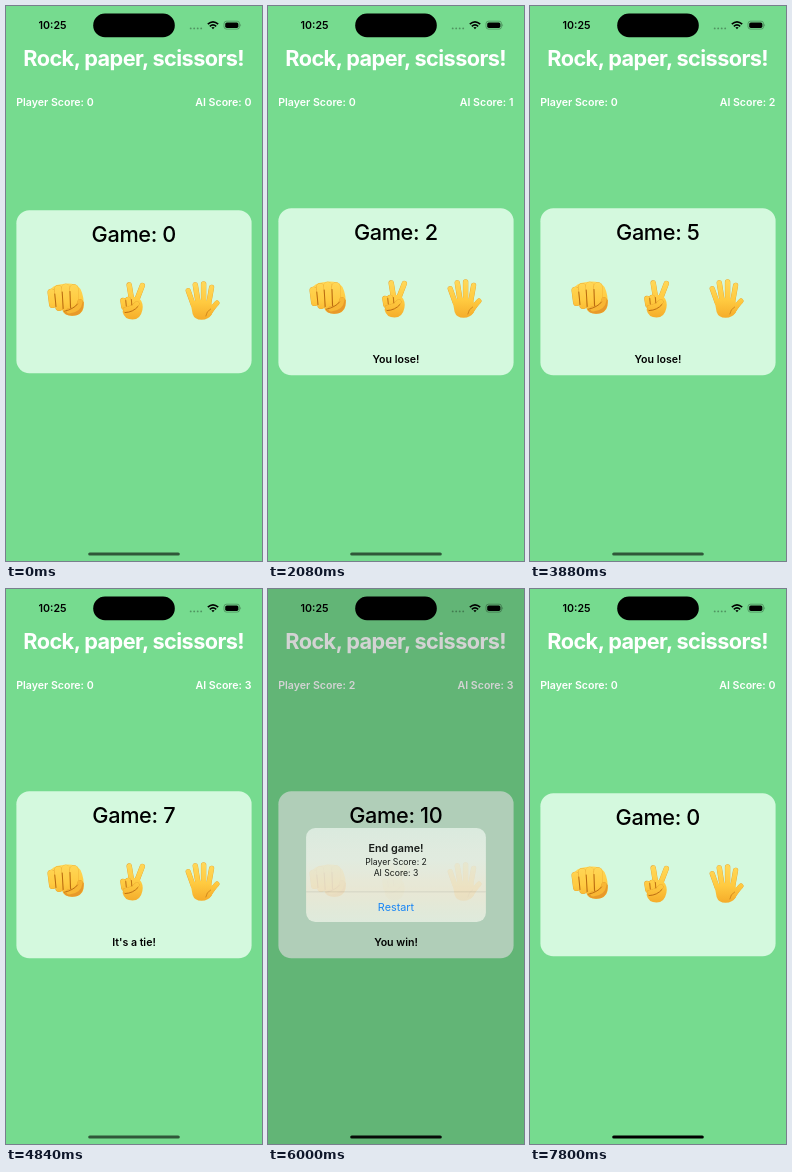
An HTML page that plays this animation: 256 by 555 pixels, repeating every 8 s.

```html
<!DOCTYPE html>
<html lang="en">
<head>
<meta charset="utf-8">
<title>Rock, paper, scissors</title>
<style>
  html, body { margin: 0; width: 100%; height: 100%; overflow: hidden; background: #76db8f; }
  svg { display: block; width: 100vw; height: 100vh; }
  text { font-family: Inter, "Liberation Sans", sans-serif; font-size: 10.6px; }
  .large { font-size: 21.7px; }
  .bold { font-weight: 700; letter-spacing: -.026em; }
  .semi { font-weight: 600; }
  .medium { font-weight: 500; letter-spacing: -.016em; }
  .small { font-size: 8.46px; }
  .mid { text-anchor: middle; }
  .end { text-anchor: end; }
  .white { fill: #fff; }
</style>
</head>
<body>
<svg viewBox="0 0 256 555" preserveAspectRatio="none">
  <defs>
    <linearGradient id="skin" gradientUnits="userSpaceOnUse" x1="0" y1="275" x2="0" y2="314">
      <stop offset="0" stop-color="#ffd95a"/>
      <stop offset=".55" stop-color="#ffca40"/>
      <stop offset="1" stop-color="#f5ac2a"/>
    </linearGradient>
    <linearGradient id="glass" x1="0" y1="0" x2="0" y2="1">
      <stop offset="0" stop-color="#e2efe5"/>
      <stop offset=".35" stop-color="#eaf0e6"/>
      <stop offset=".65" stop-color="#f2ecd9"/>
      <stop offset="1" stop-color="#e6efe2"/>
    </linearGradient>
  </defs>

  <rect width="256" height="555" fill="#76db8f"/>
  <text class="large bold white mid" x="127.7" y="59.7">Rock, paper, scissors!</text>
  <text id="player" class="semi white" x="10.2" y="99.8"></text>
  <text id="ai" class="semi white end" x="245.4" y="99.8"></text>

  <rect id="card" x="10.4" width="235.2" rx="13" fill="#d4f9de"/>
  <g id="content">
    <text id="game" class="large medium mid" x="127.8" y="236"></text>
    <g id="rock"></g>
    <g id="scissors"></g>
    <g id="paper"></g>
  </g>
  <text id="message" class="semi mid" x="128" y="356.5"></text>

  <rect id="shade" width="256" height="555"/>
  <g id="alert">
    <rect x="40" y="240" width="176" height="92" rx="9" fill="url(#glass)"/>
    <path id="pressed" d="M40 302.5H216V323a9 9 0 0 1-9 9H49a9 9 0 0 1-9-9Z" fill="#1c3a24"/>
    <path d="M40 302.5H216" stroke="#3c3c43" stroke-opacity=".25" stroke-width=".5"/>
    <text class="semi mid" x="128" y="263.6">End game!</text>
    <text class="small mid" x="128" y="276.3">Player Score: 2</text>
    <text class="small mid" x="128" y="286.8">AI Score: 3</text>
    <text class="mid" x="128" y="321.3" fill="#007aff">Restart</text>
  </g>

  <text class="semi mid" x="46.5" y="23.2">10:25</text>
  <rect x="87.2" y="7.6" width="81.6" height="23.6" rx="11.8"/>
  <path d="M184.7 22.4h12" stroke="#000" stroke-opacity=".32" stroke-width="1.9" stroke-linecap="round" stroke-dasharray="0 3.5"/>
  <g fill="none" stroke="#000" stroke-width="1.6">
    <path d="M201.8 18.2Q207 13.5 212.2 18.2M203.8 20.3Q207 17.5 210.2 20.3"/>
    <path d="M207 23.2l-1.6-1.8q1.6-1 3.2 0z" fill="#000" stroke="none"/>
  </g>
  <rect x="218" y="15.2" width="15.6" height="7.9" rx="2.5" fill="none" stroke="#000" stroke-opacity=".4" stroke-width=".7"/>
  <rect x="219.2" y="16.4" width="13.2" height="5.5" rx="1.6"/>
  <path d="M234.5 17.7q1.2 1.4 0 2.8z" fill-opacity=".45"/>
  <rect id="home" x="82.2" y="546.5" width="91.6" height="3.1" rx="1.55"/>
</svg>

<script>
const LOOP = 8000;
const DIMMED = 0.22;
const $ = id => document.getElementById(id);

// Each round: when its result shows, the hand that was pressed, and the result.
const rounds = [
  { at: 1090, hand: 'rock', text: "It's a tie!", player: 0, ai: 0 },
  { at: 1560, hand: 'rock', text: 'You lose!', player: 0, ai: 1 },
  { at: 2410, hand: 'paper', text: "It's a tie!", player: 0, ai: 1 },
  { at: 2920, hand: null, text: "It's a tie!", player: 0, ai: 1 },
  { at: 3570, hand: 'rock', text: 'You lose!', player: 0, ai: 2 },
  { at: 4090, hand: 'rock', text: 'You lose!', player: 0, ai: 3 },
  { at: 4650, hand: 'scissors', text: "It's a tie!", player: 0, ai: 3 },
  { at: 5130, hand: 'scissors', text: "It's a tie!", player: 0, ai: 3 },
  { at: 5390, hand: 'scissors', text: 'You win!', player: 1, ai: 3 },
  { at: 5640, hand: 'scissors', text: 'You win!', player: 2, ai: 3, held: true }
];
const fresh = { text: '', player: 0, ai: 0 };
const alertIn = 5810, alertOut = 7270, resetAt = 7290;

const ramp = (t, from, to) => Math.min(1, Math.max(0, (t - from) / (to - from)));
const easeOut = p => 1 - (1 - p) ** 3;
const smooth = p => p * p * (3 - 2 * p);

// Hand drawing: softly edged fingers and palms, then darker creases.
const EDGE = '#e6a02c';
const SKIN = 'url(#skin)';
const line = (d, color, width) =>
  `<path d="${d}" fill="none" stroke="${color}" stroke-width="${width}" stroke-linecap="round"/>`;
const finger = (d, width, fill = SKIN) => line(d, EDGE, width) + line(d, fill, width - 0.6);
const shape = (d, fill = SKIN) => `<path d="${d}" fill="${fill}"/>`;
const crease = (d, width = 0.9) => line(d, '#b96a10', width);

$('rock').innerHTML =
  shape('M43 286Q46 279 55 278.2Q69 275.5 74.5 283Q78.5 291 77.5 302Q76 309.8 66 309.8Q57 309.5 56 303Z') +
  shape('M60 303Q70 304 74 293L77.8 296Q78 309.8 66 309.8Q58 309.5 57 304Z', '#e8992a') +
  finger('M45.3 286.5L46.8 298.3', 7.6) +
  finger('M52.3 283.2L53.3 301', 8) +
  finger('M59.8 282L60.6 302', 8.4) +
  finger('M68 282.5L68 300', 8.6) +
  finger('M74 296Q73 304 63 305', 5.6, '#f8b634') +
  crease('M48.8 288L50 300.5M56.2 286L57.2 302.5M64 285.5L64.6 302', 1) +
  crease('M58.5 305.2Q68 303 71.5 298');

$('scissors').innerHTML =
  finger('M125.8 295L123.2 279', 5.4) +
  finger('M130 296L136.3 279.6', 5.4) +
  shape('M119 292Q125 289.5 133 292Q137.8 297 136.4 304Q134.5 313.6 126.5 313.6Q118.5 313.6 116.6 306Z') +
  finger('M117 294.6L118 301', 5.6) +
  finger('M122.3 293.6L122.8 300', 5.6) +
  finger('M119.4 303.6Q126 303 131 297.8', 5.2) +
  crease('M119.8 294.5L120.3 300M125.4 293.5L125.8 299') +
  crease('M119 306.6Q127 306.5 132 300.5');

$('paper').innerHTML =
  finger('M187.3 299L182.2 284.6', 5.2) +
  finger('M192 296L189.3 278.9', 5.4) +
  finger('M197.6 296L197.6 278', 5.4) +
  finger('M202.6 298L205.6 281.3', 5.2) +
  finger('M203 307.5Q207.5 300.5 211 297', 5.2) +
  shape('M184.6 297Q194 291 205.3 296.5L206.5 301.5L206 308Q202.5 313.8 195.5 313.8Q188.5 313.8 186.6 308Z') +
  crease('M204.6 303Q200.5 305 199.8 310', 0.6);

function handOpacity(hand, t) {
  if (t >= resetAt) return 1;
  const press = rounds.filter(r => r.hand === hand && t >= r.at - 60).pop();
  if (!press) return 1;
  const down = ramp(t, press.at - 60, press.at - 10);
  const up = press.held ? 0 : easeOut(ramp(t, press.at, press.at + 240));
  return 1 - (1 - DIMMED) * down * (1 - up);
}

function setText(id, value) {
  const node = $(id);
  if (node.textContent !== value) node.textContent = value;
}

function draw(t) {
  const game = t >= resetAt ? 0 : rounds.filter(r => t >= r.at).length;
  const state = game ? rounds[game - 1] : fresh;
  setText('player', 'Player Score: ' + state.player);
  setText('ai', 'AI Score: ' + state.ai);
  setText('game', 'Game: ' + game);
  setText('message', state.text);

  // The card grows by the message line and its content moves up.
  const grow = game ? 2 : 0;
  $('card').setAttribute('y', 204.2 - grow);
  $('card').setAttribute('height', 163 + 2 * grow);
  $('content').setAttribute('transform', `translate(0 ${-grow})`);
  for (const hand of ['rock', 'scissors', 'paper']) {
    $(hand).setAttribute('opacity', handOpacity(hand, t));
  }

  const shown = easeOut(ramp(t, alertIn, alertIn + 400));
  const hidden = smooth(ramp(t, alertOut, alertOut + 530));
  const visible = shown * (1 - hidden);
  const scale = 1 + 0.15 * (1 - shown);
  $('shade').setAttribute('opacity', 0.2 * visible);
  $('alert').setAttribute('opacity', visible);
  $('alert').setAttribute('transform', `translate(128 286) scale(${scale}) translate(-128 -286)`);
  $('pressed').setAttribute('opacity', t >= 7160 ? 0.15 * (1 - ramp(t, 7240, 7440)) : 0);
  $('home').setAttribute('opacity', 0.6 + 0.4 * shown);
}

function tick() {
  draw(performance.now() % LOOP);
  requestAnimationFrame(tick);
}
tick();
</script>
</body>
</html>
```
